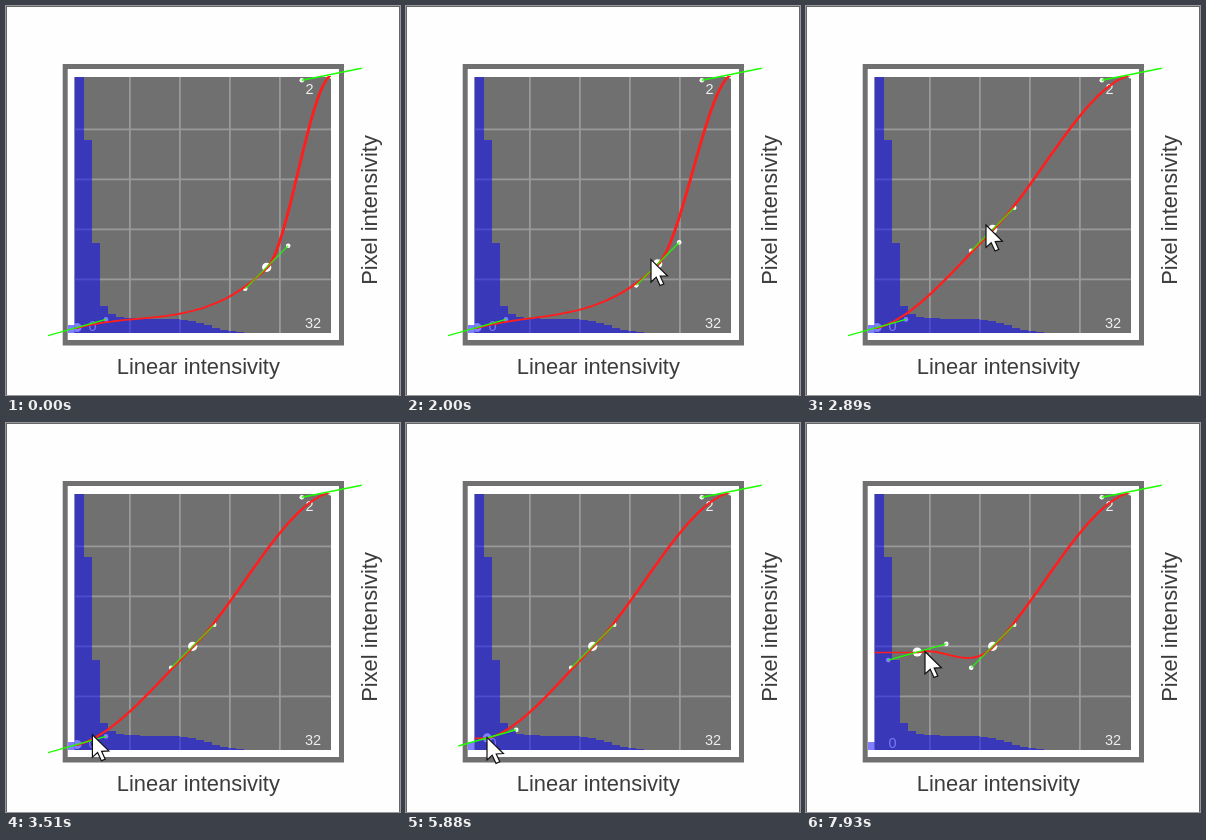
Recreate the animation shown at these times as an HTML page with a canvas. Size 394x389 px, loop 8 s.

```html
<!DOCTYPE html>
<html lang="en">
<head>
<meta charset="utf-8">
<title>Intensity curve</title>
<style>
  html, body { margin: 0; width: 100%; height: 100%; overflow: hidden; background: #fff; }
  canvas { display: block; }
</style>
</head>
<body>
<canvas id="stage" width="394" height="389"></canvas>
<script>
const ctx = document.getElementById('stage').getContext('2d');
const LOOP = 8000, START = 560, STEP = 77.6;
const PLOT = { x: 68.5, y: 71, r: 325, b: 327 };
const GREY = '#707070';
const FONT = '"Liberation Sans", Arial, sans-serif';

const easeIn = k => k * k;
const easeOut = k => 1 - (1 - k) ** 2.4;
const easeBoth = k => k * k * (3 - 2 * k);

// Pointer moves: start time, end time, destination, easing
const ENTRY = { x: 236, y: 0 };
const MOVES = [
  [560, 1260, 254, 257, easeOut],
  [1820, 2420, 186, 231, easeBoth],
  [2420, 2800, 180, 219, easeOut],
  [2900, 3560, 70, 328, easeIn],
  [3560, 3810, 69, 322, easeOut],
  [4090, 4420, 63, 290, easeBoth],
  [4420, 4740, 68, 321, easeBoth],
  [5130, 5370, 73, 318, easeBoth],
  [5650, 6300, 113, 300, easeBoth],
  [6740, 7400, 119, 228.5, easeBoth]
];

const clamp = (v, lo, hi) => Math.min(hi, Math.max(lo, v));

function pointer(t) {
  let { x, y } = ENTRY;
  for (const [from, to, tx, ty, ease] of MOVES) {
    const k = ease(clamp((t - from) / (to - from), 0, 1));
    x += (tx - x) * k;
    y += (ty - y) * k;
  }
  return { x, y };
}

// Each key follows the pointer while it is being dragged.
function midKey(t) {
  const p = pointer(clamp(t, 1820, 2900));
  return { x: p.x + 6.7, y: p.y + 4.3, slope: 1, reach: 21.5 };
}

function lowKey(t) {
  const p = pointer(clamp(t, 5130, LOOP));
  return { x: 71 + (p.x - 68) * 0.79, y: p.y + 0.5, slope: 0.28, reach: 29 };
}

const high = { x: 325.8, y: 68.3, slope: 0.2, reach: 30 };

function box(x, y, r, b, color) {
  ctx.fillStyle = color;
  ctx.fillRect(x, y, r - x, b - y);
}

function dot(x, y, radius) {
  ctx.fillStyle = '#fff';
  ctx.beginPath();
  ctx.arc(x, y, radius, 0, 7);
  ctx.fill();
}

function text(str, x, y, size, color) {
  ctx.font = size + 'px ' + FONT;
  ctx.fillStyle = color;
  ctx.fillText(str, x, y);
}

function line(x1, y1, x2, y2) {
  ctx.beginPath();
  ctx.moveTo(x1, y1);
  ctx.lineTo(x2, y2);
  ctx.stroke();
}

function drawBoard() {
  box(0, 0, 394, 389, '#666');
  box(1, 1, 393, 389, '#fefefe');
  box(56.7, 58, 338, 339.5, GREY);
  box(61.7, 63, 333, 334, '#fff');
  box(PLOT.x, PLOT.y, PLOT.r, PLOT.b, GREY);
  for (let i = 0; i < 4; i++) {
    const x = 123 + i * 50, y = 122.5 + i * 50;
    box(x, PLOT.y, x + 1.8, PLOT.b, '#999');
    box(PLOT.x, y, PLOT.r, y + 1.8, '#999');
  }
  text('2', 299.5, 88, 14.5, '#eee');
  text('32', 299, 322, 14.5, '#eee');
  text('0', 82.5, 325, 14.5, '#eee');
  text('Linear intensivity', 110.8, 367.6, 21.9, '#3c3c3c');
  ctx.save();
  ctx.translate(371, 278.8);
  ctx.rotate(-Math.PI / 2);
  text('Pixel intensivity', 0, 0, 21.9, '#3c3c3c');
  ctx.restore();
}

// A steep peak followed by a low shelf that fades out.
function barHeight(i) {
  const peak = 256 * Math.exp(-0.28 * i ** 1.9);
  const shelf = 14.3 / (1 + Math.exp((i - 16.2) / 1.4)) + 90 * Math.exp(-0.75 * i);
  return Math.round(Math.max(peak, shelf));
}

function drawHistogram() {
  ctx.fillStyle = 'rgba(0,0,255,.5)';
  ctx.beginPath();
  ctx.rect(62, 319, PLOT.x - 62, 8);
  for (let i = 0, x = PLOT.x; i < 22; i++) {
    const right = 78 + i * 8, h = barHeight(i);
    ctx.rect(x, PLOT.b - h, right - x, h);
    x = right;
  }
  ctx.fill();
}

// Steep parts of the curve are heavier than flat ones.
function stroke(x1, y1, x2, y2) {
  const rise = (y2 - y1) / Math.hypot(x2 - x1, y2 - y1);
  ctx.lineWidth = 1.7 + 1.2 * rise * rise;
  line(x1, y1, x2, y2);
}

function drawSpan(a, b) {
  const third = (b.x - a.x) / 3, n = 48;
  const ya = a.y - third * a.slope, yb = b.y + third * b.slope;
  let px = a.x, py = a.y;
  for (let i = 1; i <= n; i++) {
    const t = i / n, u = 1 - t;
    const x = a.x + (b.x - a.x) * t;
    const y = u * u * u * a.y + 3 * u * u * t * ya + 3 * u * t * t * yb + t * t * t * b.y;
    stroke(px, py, x, y);
    px = x;
    py = y;
  }
}

function drawKey(k) {
  const dy = k.reach * k.slope;
  dot(k.x, k.y, 4.6);
  dot(k.x - k.reach, k.y + dy, 2.3);
  dot(k.x + k.reach, k.y - dy, 2.3);
}

function drawHandle(k) {
  const dy = k.reach * k.slope;
  line(k.x - k.reach, k.y + dy, k.x + k.reach, k.y - dy);
}

function clipPlot(paint) {
  ctx.save();
  ctx.beginPath();
  ctx.rect(PLOT.x, PLOT.y - 1, PLOT.r - PLOT.x, PLOT.b - PLOT.y + 1);
  ctx.clip();
  paint();
  ctx.restore();
}

function drawCursor(p) {
  const shape = [[0, 0], [0, 22.5], [5.2, 17.8], [9, 26], [12.8, 24.4], [9.2, 16.6], [16.4, 16.2]];
  ctx.beginPath();
  shape.forEach(([x, y]) => ctx.lineTo(p.x + x, p.y + y));
  ctx.closePath();
  ctx.fillStyle = '#fff';
  ctx.fill();
  ctx.strokeStyle = '#111';
  ctx.lineWidth = 1.2;
  ctx.stroke();
}

function draw(time) {
  const step = Math.floor((time - START + 15) / STEP);
  const t = START + step * STEP;
  const low = lowKey(t), mid = midKey(t);
  const keys = [low, mid, high];

  drawBoard();
  clipPlot(() => keys.forEach(drawKey));
  drawHistogram();

  ctx.lineCap = 'round';
  ctx.strokeStyle = '#ff1e1e';
  clipPlot(() => {
    ctx.translate(0.5, 0.5);
    stroke(PLOT.x, low.y, low.x, low.y);
    drawSpan(low, mid);
    drawSpan(mid, high);
  });

  ctx.lineCap = 'butt';
  ctx.strokeStyle = '#1eff00';
  ctx.lineWidth = 1.5;
  keys.forEach(k => {
    ctx.globalAlpha = k === mid ? 0.75 : 1;
    drawHandle(k);
  });
  ctx.globalAlpha = 1;

  if (step >= 0) drawCursor(pointer(t));
}

const began = performance.now();
function tick() {
  draw((performance.now() - began) % LOOP);
  requestAnimationFrame(tick);
}
tick();
</script>
</body>
</html>
```
